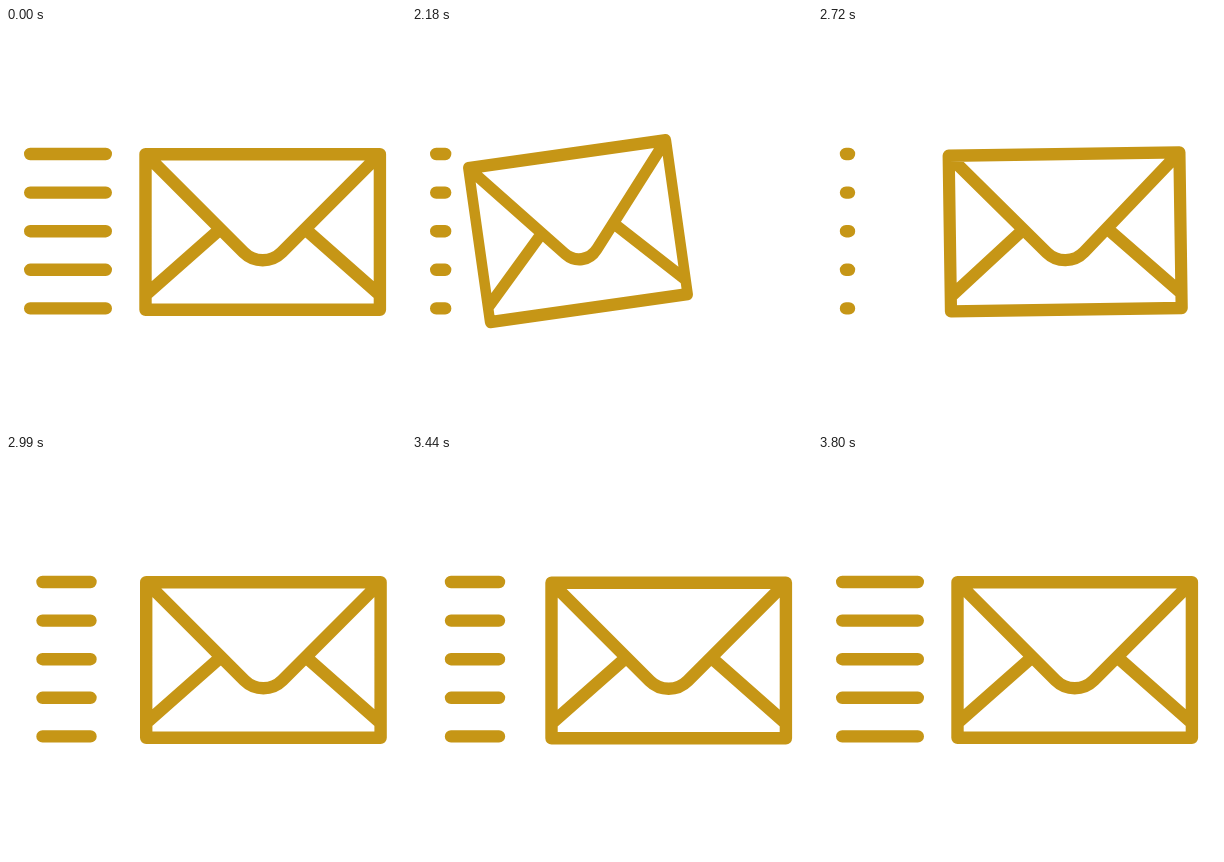
Recreate the animation shown at these times as an HTML page. Size 400 by 400 pixels, loop 3830 ms.

```html
<!DOCTYPE html>
<html lang="en">
<head>
<meta charset="utf-8">
<title>Sending mail</title>
<style>
  html, body { margin: 0; width: 100%; height: 100%; overflow: hidden; background: #fff; }
  svg { display: block; width: 100%; height: 100%; }
  path { fill: none; stroke: #c69616; stroke-width: 12.4; stroke-linecap: round; stroke-linejoin: round; }
</style>
</head>
<body>
<svg viewBox="0 0 400 400">
  <path id="lines"/>
  <path id="envelope" d="M-117.2-77.8H117.2V77.8H-117.2Z L-19 20.4A26.9 26.9 0 0 0 19 20.4L117.2-77.8 M-117.2 63L-43-2.5 M117.2 63L43-2.5"/>
</svg>
<script>
const LOOP = 3830, START = 2030, STEP = 30;
const lines = document.getElementById('lines');
const envelope = document.getElementById('envelope');

const clamp = v => Math.min(1, Math.max(0, v));
const span = (t, a, b) => clamp((t - a) / (b - a));
const cubicInOut = u => u < .5 ? 4 * u ** 3 : 1 - 4 * (1 - u) ** 3;
const sineInOut = u => (1 - Math.cos(Math.PI * u)) / 2;

// time, left end, right end of the speed lines
const pulses = [
  [2720, 28, 31], [2830, 14.2, 110], [2990, 36.5, 84.5], [3215, 14.2, 110],
  [3440, 39, 87], [3635, 14.2, 110], [3800, 24.2, 99.8]
];

// 0 at rest, 1 when fully drawn back
function pull(t) {
  if (t < START) return 0;
  if (t < 2440) return 1 - .566 * (1 - span(t, START, 2440)) ** 3;
  return 1 - cubicInOut(span(t, 2440, 2830));
}

function lineEnds(t, p) {
  if (t < 2600) {
    const length = 75.6 * (1 - 1.03 * p);
    return length > 0 ? [24.2, 24.2 + length] : null;
  }
  if (t < pulses[0][0]) return null;
  const i = Math.max(1, pulses.findIndex(k => k[0] >= t));
  const [a, b] = [pulses[i - 1], pulses[i]];
  const u = sineInOut(span(t, a[0], b[0]));
  return [1, 2].map(n => a[n] + (b[n] - a[n]) * u);
}

function draw(t) {
  const p = pull(t);
  const shake = span(t, 2780, 2930) * (1 - span(t, 3650, 3800));
  const phase = (t - 2990) / 600 * 2 * Math.PI;
  const x = 256.7 - 106 * p + .7 * shake * Math.cos(phase);
  const y = 204 - p - .5 * shake * Math.sin(phase);
  envelope.setAttribute('transform',
    `translate(${x} ${y}) rotate(${-9.4 * p}) scale(${1 - .174 * p} 1)`);

  const ends = lineEnds(t, p);
  lines.setAttribute('d', ends
    ? [0, 1, 2, 3, 4].map(i => `M${ends[0]} ${126 + i * 38.6}H${ends[1]}`).join('')
    : '');
}

const begin = performance.now();
function frame() {
  const t = (performance.now() - begin) % LOOP;
  draw(t < START ? 0 : START + Math.floor((t - START) / STEP) * STEP);
  requestAnimationFrame(frame);
}
frame();
</script>
</body>
</html>
```
